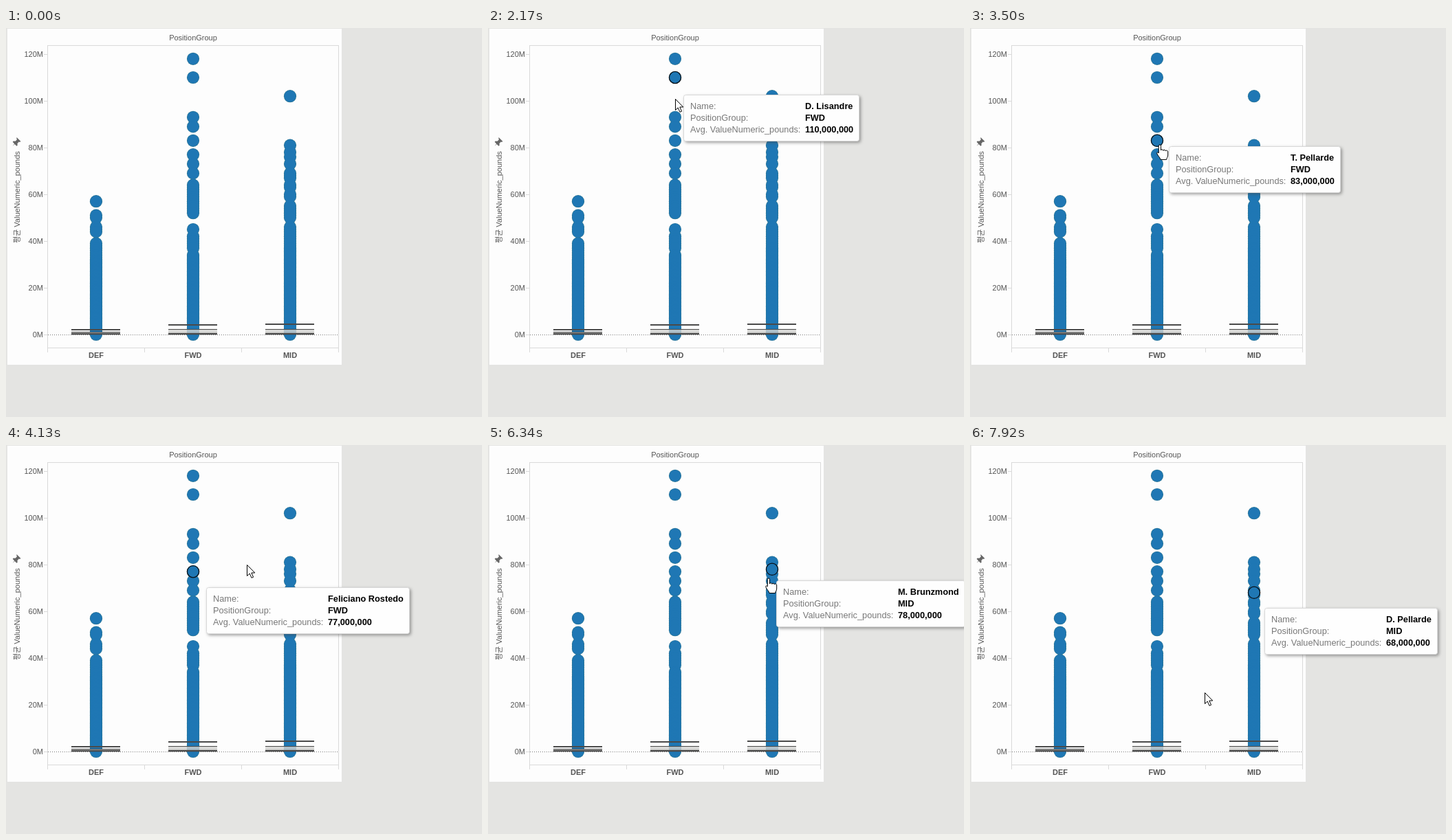
Animation of 692 by 566 pixels, one loop 8 s. Source, as an HTML page:

```html
<!DOCTYPE html>
<html lang="en">
<head>
<meta charset="utf-8">
<title>Value by position group</title>
<style>
  html, body { margin: 0; width: 100%; height: 100%; overflow: hidden; background: #e4e4e2; }
  svg { display: block; width: 692px; height: 566px; }
  text { font: 11px "Liberation Sans", Arial, sans-serif; fill: #555; }
  .b { font-weight: bold; }
  .side { font-family: "Liberation Sans", "Noto Sans CJK KR", "Noto Sans CJK", sans-serif; }
  .axis { stroke: #dadada; fill: none; }
  .box { stroke: #4a4a4a; fill: none; }
  #tip { filter: drop-shadow(2px 2px 2px rgba(70, 70, 70, .5)); }
  #tip text { font-size: 12.75px; fill: #787878; }
  #tip .b { fill: #000; }
  .cursor { fill: #fff; stroke: #000; stroke-linejoin: round; }
</style>
</head>
<body>
<svg viewBox="0 0 692 566">
  <rect x="2" y="1" width="486" height="489" fill="#fdfdfd"/>
  <text x="272" y="18" text-anchor="middle">PositionGroup</text>
  <text class="side" transform="translate(20 313) rotate(-90)">평균 ValueNumeric_pounds</text>
  <path fill="#666" d="M15.5 159l6 6-1.6 1-1-.4-2.4 2.5.2 2.6-1.3 1.1-2.6-2.7-3 2.6 2.4-3.3-2.5-2.6 1.2-1.2 2.6.2 2.4-2.4-.5-1.6z"/>
  <g id="axes">
    <rect class="axis" x="60.5" y="25.5" width="423" height="440"/>
    <path class="axis" d="M60.5 466v6M201.5 466v6M342.5 466v6M483.5 466v6"/>
  </g>
  <path d="M61 446.5H484" stroke="#777" stroke-dasharray="1 2"/>
  <g id="edges" fill="#2b7593"></g>
  <g id="dots" fill="#1f77b4"></g>
  <g id="boxes"></g>
  <circle id="ring" r="8.6" fill="#1f77b4" stroke="#0a1016" stroke-width="1.3"/>
  <g id="tip">
    <rect id="card" height="67" x=".5" y=".5" rx="3" fill="#fefefe" stroke="#d8d8d8"/>
    <text x="10" y="21">Name:</text>
    <text x="10" y="38">PositionGroup:</text>
    <text x="10" y="55">Avg. ValueNumeric_pounds:</text>
    <text class="b" id="name" x="177" y="21"/>
    <text class="b" id="group" x="177" y="38"/>
    <text class="b" id="value" x="177" y="55"/>
  </g>
  <path id="arrow" class="cursor" d="M.5.5V16.5L4.2 13 7 19.3 9.6 18.2 6.8 12H11.8z"/>
  <path id="hand" class="cursor" d="M-1.7 12V1.5a1.6 1.6 0 0 1 3.2 0V8c0-1.6 3.4-1.6 3.4.4 0-1.6 3.4-1.4 3.4.6 0-1.4 3.4-1.2 3.4 1V15c0 3-2 4-2 6.5H1c0-2.5-4.2-5.5-5.2-9-.5-2 1.8-2 2.5-.5z"/>
</svg>
<script>
const $ = id => document.getElementById(id);
const make = (parent, tag, attrs, text) => {
  const el = document.createElementNS('http://www.w3.org/2000/svg', tag);
  for (const k in attrs) el.setAttribute(k, attrs[k]);
  if (text) el.textContent = text;
  return parent.appendChild(el);
};
const yOf = m => 446 - m * 3.4;

// values in millions: outliers, runs of whole millions, then every half million
const groups = {
  DEF: { x: 131, solid: 32, whisker: 439, top: 442, outliers: [57], runs: [[51, 50], [46, 44], [39, 33]] },
  FWD: { x: 272, solid: 34, whisker: 432, top: 438, outliers: [118, 110, 93, 89, 83, 77, 73, 69], runs: [[64, 52], [45, 45], [42, 37]] },
  MID: { x: 413, solid: 37, whisker: 431, top: 438, outliers: [102, 81, 78, 76, 73], runs: [[69, 67], [64, 63], [60, 59], [55, 50], [46, 38]] }
};

for (let m = 0; m <= 120; m += 20) {
  const y = yOf(m);
  make($('axes'), 'text', { x: 54, y: y + 3.5, 'text-anchor': 'end' }, m + 'M');
  make($('axes'), 'path', { class: 'axis', d: `M55 ${y + .5}h5` });
}

const marks = [];
for (const key in groups) {
  const { x, solid, whisker, top, outliers, runs } = groups[key];
  const add = m => marks.push({ key, m, x, y: yOf(m) });
  outliers.forEach(add);
  for (const [from, to] of runs) for (let m = from; m >= to; m--) add(m);
  for (let m = solid; m >= 0; m -= .5) add(m);

  const left = x - 36;
  const line = (y, w) => make($('boxes'), 'path', { class: 'box', d: `M${left} ${y}h71`, 'stroke-width': w });
  make($('boxes'), 'rect', { x: left, y: top, width: 71, height: 446 - top, fill: '#d2d2d0', 'fill-opacity': .8 });
  line(whisker, 2);
  line(top + .5, 1);
  line(445, 2.6);
  make($('axes'), 'text', { class: 'b', x, y: 480, 'text-anchor': 'middle' }, key);
}
for (const { x, y } of marks) {
  make($('edges'), 'circle', { cx: x, cy: y, r: 9.1 });
  make($('dots'), 'circle', { cx: x, cy: y, r: 8.4 });
}

const stars = { FWD118: 'Toveno Jr', FWD93: 'L. Kovard', FWD77: 'Feliciano Rostedo', MID102: 'R. De Valmee', MID78: 'M. Brunzmond' };
const surnames = ['Lisandre', 'Tarvell', 'Ondrake', 'Pellarde', 'Hallmere'];
const nameOf = ({ key, m }) => stars[key + m] || 'BCDPST'[m % 6] + '. ' + surnames[m % 5];

// cursor key points: time, x, y
const path = [
  [340, 440, 190], [800, 268, 50], [1140, 267, 56], [1340, 269, 71], [2680, 274, 123],
  [2880, 274, 135], [3930, 277, 194], [4130, 350, 174], [4600, 414, 110], [5300, 414, 110],
  [6140, 405, 184], [6340, 408, 194], [7280, 410, 216], [7360, 426, 220], [7860, 410, 225],
  [7920, 341, 360], [8000, 341, 360]
];
const LAG = 200, HOLD = 400, REACH = 12.5;

function cursorAt(t) {
  const i = path.findIndex(p => p[0] > t);
  if (i < 1) return null;
  const [t0, x0, y0] = path[i - 1], [t1, x1, y1] = path[i];
  const k = (t - t0) / (t1 - t0);
  return { x: Math.round(x0 + (x1 - x0) * k), y: Math.round(y0 + (y1 - y0) * k) };
}

const markAt = p => p && marks.find(d => Math.hypot(p.x - d.x, p.y - d.y) < REACH);

// the tooltip trails the cursor and lingers after it leaves a mark
function hoverAt(t) {
  for (let back = LAG; back <= LAG + HOLD; back += 20) {
    const pos = cursorAt(t - back), mark = markAt(pos);
    if (mark) return { mark, pos };
  }
}

const show = (el, on) => el.setAttribute('visibility', on ? 'visible' : 'hidden');
const move = (el, x, y) => el.setAttribute('transform', `translate(${x} ${y})`);

function drawTip(hover) {
  show($('tip'), hover);
  show($('ring'), hover);
  if (!hover) return;
  const { mark, pos } = hover;
  $('name').textContent = nameOf(mark);
  $('group').textContent = mark.key;
  $('value').textContent = (mark.m * 1e6).toLocaleString('en-US');
  const wide = Math.max($('name').getComputedTextLength(), $('value').getComputedTextLength());
  $('card').setAttribute('width', Math.round(wide) + 185);
  move($('tip'), pos.x + 14, pos.y + 13);
  move($('ring'), mark.x, mark.y);
}

function draw(t) {
  const pos = cursorAt(t), over = markAt(pos);
  drawTip(hoverAt(t));
  show($('hand'), over);
  show($('arrow'), pos && !over);
  if (pos) move(over ? $('hand') : $('arrow'), pos.x, pos.y);
}

const start = performance.now();
function tick() {
  draw((performance.now() - start) % 8000);
  requestAnimationFrame(tick);
}
tick();
</script>
</body>
</html>
```
